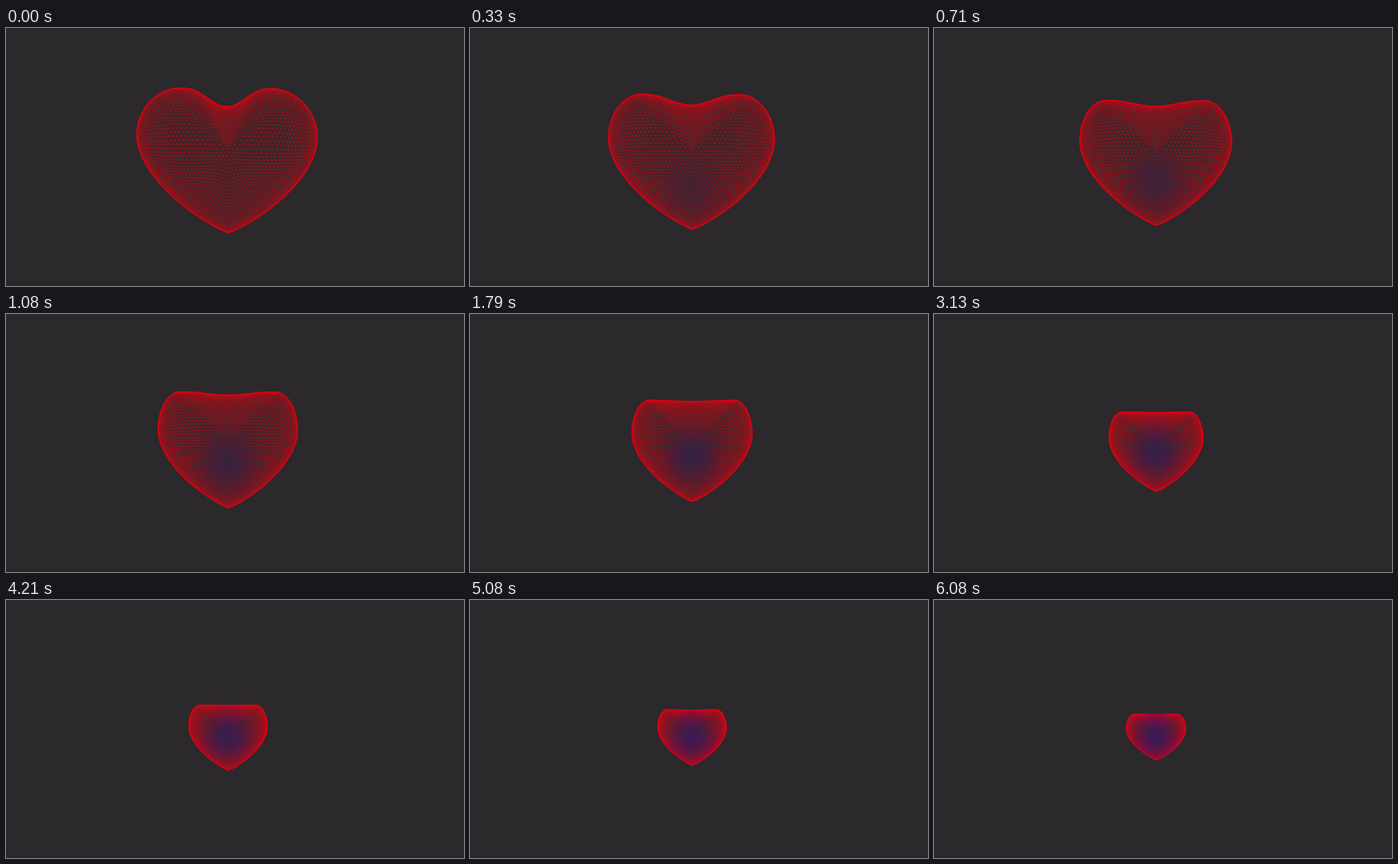
Recreate the animation shown at these times as an HTML page with a canvas. Size 640x360 px, loop 6.12 s.

```html
<!DOCTYPE html>
<html lang="en">
<head>
<meta charset="utf-8">
<title>Wireframe heart</title>
<style>
  html, body { margin: 0; width: 100%; height: 100%; overflow: hidden; background: #2b292b; }
  canvas { display: block; width: 640px; height: 360px; }
</style>
</head>
<body>
<canvas id="stage" width="640" height="360"></canvas>
<script>
const ctx = document.getElementById('stage').getContext('2d');
const LOOP = 6120, HOLD = 80, STEP = 6000 / 144;
const WIDEST = .335;    // height of the widest point, as a share of the whole
const CELL = .035;      // side of a mesh triangle, for a heart of radius 1
const REACH = Math.ceil(1.3 / CELL);
const RED = [226, 0, 16], BLUE = [68, 13, 124];

const mix = (a, b, k) => a + (b - a) * k;

// Perspective shrink of an edge while the camera moves back.
const recede = (size, offset, span, t) => (size + offset) * span / (t + span) - offset;

function poseAt(t) {
  const near = Math.exp(-t / 600);
  return {
    half: recede(126.5, 20, 4400, t),
    top: 190 - recede(106, 30, 4930, t),
    bottom: 190 + recede(96, 90, 12010, t),
    axis: 310 - 2 * near,
    cleft: .5 + 25 * near,
    lobe: .72 - .22 * near,
    lean: 1 + 2 * near,
    tilt: near,
    blue: 1 - near,
    blueRadius: .5 + .11 * t / 1000,
    blueY: 189 + 45 * Math.exp(-t / 1100)
  };
}

// Right half of the silhouette, from cleft over the lobe to the tip, as polar points.
function outline({ half, top, bottom, cleft, lobe }, middle) {
  const height = bottom - top, points = [], parts = 40;
  const add = (x, y) => {
    const dx = x * half, dy = middle - (top + y * height);
    points.push({ angle: Math.atan2(dx, dy), radius: Math.hypot(dx, dy) });
  };
  for (let i = 0; i < parts; i++) {
    const s = i / parts;
    add(lobe * s, cleft / height * ((1 + Math.cos(Math.PI * s)) / 2) ** 1.3);
  }
  for (let i = 0; i < parts; i++) {
    const a = i / parts * Math.PI / 2;
    add(lobe + (1 - lobe) * Math.sin(a), WIDEST * (1 - Math.cos(a)));
  }
  for (let i = 0; i <= parts; i++) {
    const v = i === parts ? 1 : Math.sin(i / parts * Math.PI / 2);
    add((1 - v ** 1.8) ** .86, mix(WIDEST, 1, v));
  }
  return points;
}

function radiusAt(points, angle) {
  const i = Math.max(1, points.findIndex(p => p.angle >= angle));
  const a = points[i - 1], b = points[i];
  return mix(a.radius, b.radius, (angle - a.angle) / (b.angle - a.angle));
}

// Maps a node of the triangular lattice onto the rounded front of the heart.
function projector(pose) {
  const { half, top, bottom, axis, lean, tilt } = pose;
  const middle = mix(top, bottom, .42);
  const edge = outline(pose, middle);
  return (i, j) => {
    const u = (i + j / 2) * CELL, v = j * CELL * Math.sqrt(3) / 2;
    const r = Math.hypot(u, v);
    if (r > 1 + CELL) return null;
    const angle = Math.atan2(u, -v);
    const reach = radiusAt(edge, Math.abs(angle)) * Math.sin(Math.min(1, r) * Math.PI / 2);
    const x = reach * Math.sin(angle), y = middle - reach * Math.cos(angle);
    return [axis + x + lean * (y - top) / (bottom - top), y + tilt * x / half];
  };
}

function inkFor({ axis, half, blue, blueRadius, blueY }) {
  const ink = ctx.createRadialGradient(axis, blueY, 0, axis, blueY, half * blueRadius);
  for (let at = 0; at <= 1; at += .25) {
    const k = blue * (1 + Math.cos(Math.PI * at)) / 2;
    ink.addColorStop(at, `rgb(${RED.map((v, n) => Math.round(mix(v, BLUE[n], k)))})`);
  }
  return ink;
}

function strand(nodeAt) {
  ctx.beginPath();
  for (let k = -2 * REACH; k <= 2 * REACH; k++) {
    const node = nodeAt(k);
    if (node) ctx.lineTo(...node);
  }
  ctx.stroke();
}

function draw(t) {
  const pose = poseAt(t), project = projector(pose);
  ctx.globalAlpha = 1;
  ctx.fillStyle = '#2b292b';
  ctx.fillRect(0, 0, 640, 360);
  ctx.fillStyle = '#282628';
  ctx.fillRect(0, 356, 640, 4);

  ctx.strokeStyle = inkFor(pose);
  ctx.lineWidth = .8;
  ctx.lineJoin = 'round';
  ctx.globalAlpha = .56;
  for (let n = -REACH; n <= REACH; n++) {
    strand(k => project(k, n));
    strand(k => project(n, k));
    strand(k => project(n - k, k));
  }
}

const start = performance.now();
let shown = -1;
function tick() {
  const t = Math.max(0, performance.now() - start) % LOOP;
  const step = t < HOLD ? 0 : HOLD + Math.floor((t - HOLD) / STEP + 1e-6) * STEP;
  if (step !== shown) draw(shown = step);
  requestAnimationFrame(tick);
}
tick();
</script>
</body>
</html>
```
